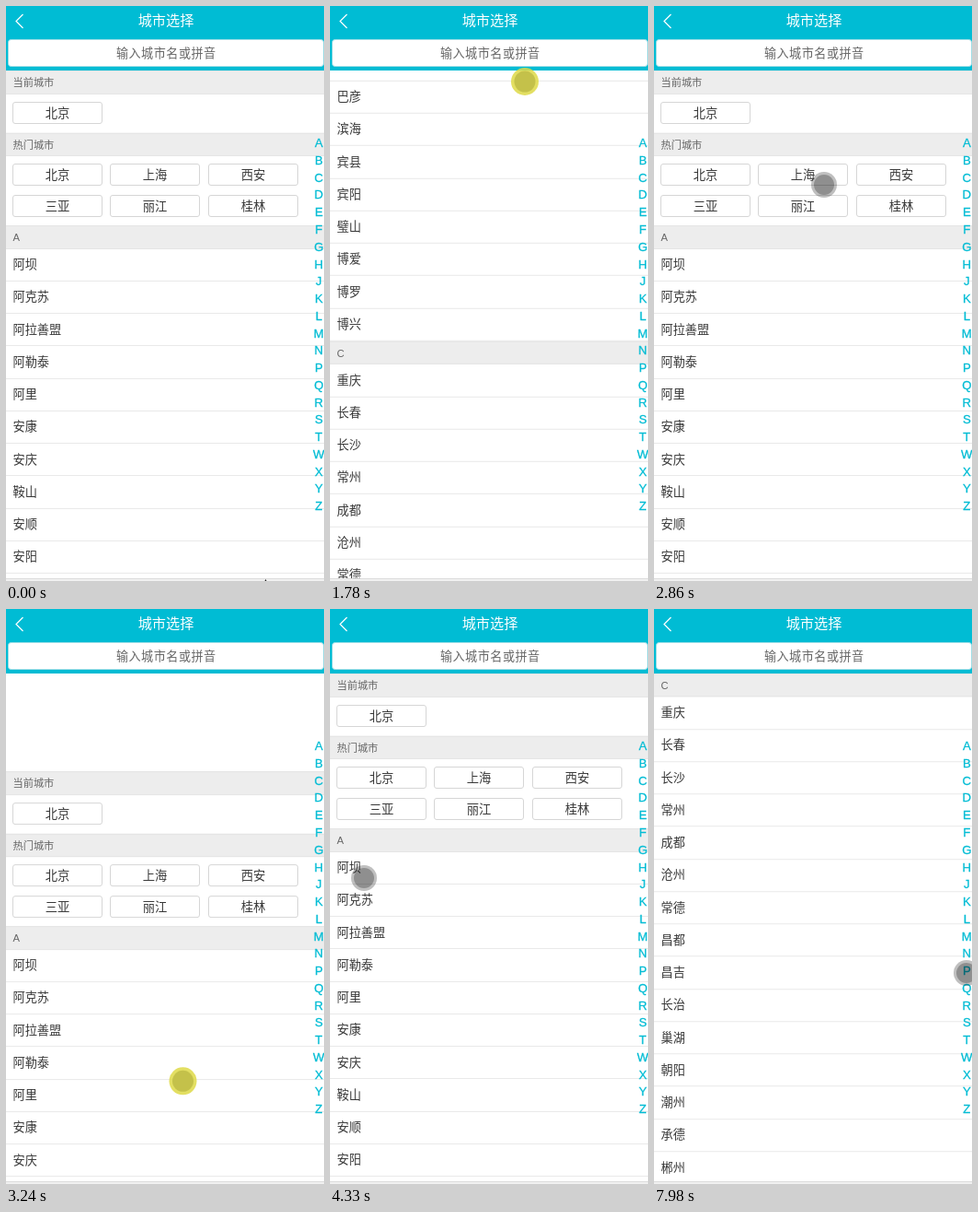
Write an HTML page that moves like this. It is 346 px wide and 624 px high and loops after 8 s.

```html
<!DOCTYPE html>
<html lang="zh-CN">
<head>
<meta charset="utf-8">
<title>城市选择</title>
<style>
  html, body { margin: 0; width: 100%; height: 100%; overflow: hidden; background: #fff; }
  svg { display: block; width: 346px; height: 624px; }
  text { font-family: "Noto Sans CJK SC", "Noto Sans CJK", "Noto Sans", sans-serif; }
  .latin { font-family: "Liberation Sans", Arial, sans-serif; }
  #index text { stroke: #00bcd4; stroke-width: .3px; }
  .title { font-weight: 500; }
  .hint { letter-spacing: .5px; }
</style>
</head>
<body>
<svg id="stage" viewBox="0 0 346 624">
  <rect width="346" height="624" fill="#fff"/>
  <g id="list"></g>
  <g id="index"></g>
  <rect y="621" width="346" height="3" fill="#f1f1f1"/>
  <rect y="621" width="346" height="1" fill="#dcdcdc"/>
  <g id="head">
    <rect width="346" height="70" fill="#00bcd4"/>
    <path d="M18.5 9 L11 16.5 L18.5 24" fill="none" stroke="#fff" stroke-width="1.2"/>
    <rect x="2.5" y="36.5" width="343" height="29" rx="3" fill="#fff" stroke="#a3dfe7"/>
  </g>
  <path id="tip" d="M281.5 624 L282.5 622 L283.5 624Z" fill="#222"/>
  <g id="cursor">
    <circle id="ring"/>
    <circle id="core"/>
  </g>
</svg>
<script>
const LOOP = 8000, STEP = 77.5, PHASE = 850;
const ROW = 35.25, BAR = 25.5, TOP = 70;
const $ = id => document.getElementById(id);
const list = $("list");

function add(parent, tag, attrs, content) {
  const el = document.createElementNS("http://www.w3.org/2000/svg", tag);
  for (const key in attrs) el.setAttribute(key, attrs[key]);
  if (content) el.textContent = content;
  parent.appendChild(el);
}

// Places text by the middle of its line.
function label(parent, content, x, mid, size, fill, anchor = "start", cls = "") {
  add(parent, "text", {
    x, y: mid + size * 0.37, "font-size": size, fill, "text-anchor": anchor, class: cls
  }, content);
}

function rule(y, fill) {
  add(list, "rect", { y: Math.round(y), width: 346, height: 1, fill });
}

function bar(content, y) {
  add(list, "rect", { y, width: 346, height: BAR, fill: "#ededed" });
  rule(y, "#e5e5e5");
  rule(y + BAR - 1, "#e5e5e5");
  label(list, content, 7.5, y + 13, 11.2, "#666", "start", content.length === 1 ? "latin" : "");
}

function button(content, col, y) {
  const x = Math.floor(col * 106.5) + 7.5;
  add(list, "rect", {
    x, y: y + 0.5, width: 97, height: 23, rx: 2.5, fill: "#fff", stroke: "#d6d6d6"
  });
  label(list, content, x + 48.5, y + 12, 13.3, "#383838", "middle");
}

const cities = {
  A: "阿坝 阿克苏 阿拉善盟 阿勒泰 阿里 安康 安庆 鞍山 安顺 安阳 " +
     "阿城 安福 安吉 安宁 安丘 安溪 安义 安远",
  B: "北京 白城 百色 白山 白银 保定 宝鸡 保山 包头 巴中 北海 蚌埠 本溪 毕节 滨州 亳州 " +
     "巴南 巴彦 滨海 宾县 宾阳 璧山 博爱 博罗 博兴",
  C: "重庆 长春 长沙 常州 成都 沧州 常德 昌都 昌吉 长治 巢湖 朝阳 潮州 承德 郴州 赤峰 池州"
};
const barTop = {};

bar("当前城市", TOP);
button("北京", 0, 104);
bar("热门城市", 137.5);
"北京 上海 西安 三亚 丽江 桂林".split(" ").forEach((name, i) =>
  button(name, i % 3, 171 + 34 * Math.floor(i / 3)));

let y = 238;
for (const letter in cities) {
  barTop[letter] = y;
  bar(letter, y);
  y += BAR;
  for (const name of cities[letter].split(" ")) {
    label(list, name, 7.5, y + 16.7, 13.2, "#383838");
    y += ROW;
    rule(y - 1, "#e9e9e9");
  }
}

[..."ABCDEFGHJKLMNPQRSTWXYZ"].forEach((c, i) =>
  label($("index"), c, 340.3, 148.3 + i * 18.76, 13.2, "#00bcd4", "middle", "latin"));

label($("head"), "城市选择", 174, 15.4, 15.2, "#fff", "middle", "title");
label($("head"), "输入城市名或拼音", 174.3, 51.2, 13.1, "#666", "middle", "hint");

// Each visit of the pointer: stops of [time, x, y], visible from first to last.
const visits = [
  [[70, 274, 640], [380, 167, 284], [530, 160, 302], [772, 160, 302], [1000, 190, 500],
   [1390, 205, 41], [1780, 212, 82], [2090, 209, 601], [2470, 209, 601], [2865, 185, 194],
   [3330, 194, 576], [4260, 21, 300], [4335, 37, 292], [4410, 37, 292], [4570, 196, 249],
   [4640, 196, 249]],
  [[5190, 338, 187], [5730, 338, 182], [5900, 338, 182], [6120, 333, 195], [6280, 290, 209],
   [6820, 21, 79], [7130, 15, 89], [7280, 282, 274], [7360, 282, 274]],
  [[7910, 341, 397], [7980, 340, 395], [LOOP, 340, 395]]
];

// The list follows the finger from down to up, then coasts to rest until end.
const gestures = [
  { down: 1000, up: 1390, end: 1775, rest: barTop.C - 363 },
  { down: 1775, up: 2090, end: 2400, rest: -14 },
  { down: 2400, up: 2400, end: 2865, rest: 0 },
  { down: 2865, up: 3330, end: 4180, rest: 0 },
  { down: 5730, up: 5885, end: 5885, rest: barTop.C - TOP }
];

const easeOut = p => 1 - (1 - p) ** 3;
const mix = (a, b, p) => a + (b - a) * p;

function pointer(t) {
  const stops = visits.findLast(v => t >= v[0][0]) || visits[0];
  const next = stops.findIndex(s => t < s[0]);
  if (next === 0) return stops[0].slice(1);
  if (next < 0) return stops.at(-1).slice(1);
  const [t0, x0, y0] = stops[next - 1], [t1, x1, y1] = stops[next];
  const p = (t - t0) / (t1 - t0);
  return [mix(x0, x1, p), mix(y0, y1, p)];
}

function scrollAt(t) {
  let pos = 0;
  for (const { down, up, end, rest } of gestures) {
    if (t < down) break;
    const drag = pointer(Math.min(t, up))[1] - pointer(down)[1];
    pos -= drag;
    if (pos < 0 && drag > 0) pos /= 3;  // resistance past the top
    if (t < up) break;
    pos = mix(pos, rest, t < end ? easeOut((t - up) / (end - up)) : 1);
  }
  return pos;
}

function circle(id, r, fill) {
  $(id).setAttribute("r", r);
  $(id).setAttribute("fill", fill);
}

const move = (id, x, y) =>
  $(id).setAttribute("transform", `translate(${x.toFixed(2)} ${y.toFixed(2)})`);
const show = (id, on) => $(id).setAttribute("visibility", on ? "visible" : "hidden");

function draw(t) {
  // Each pose is held for about a thirteenth of a second.
  const held = PHASE + STEP * Math.floor((t - PHASE) / STEP + 0.25);
  move("list", 0, -scrollAt(held));
  move("cursor", ...pointer(held));
  show("cursor", visits.some(v => t >= v[0][0] && t < v.at(-1)[0]));
  show("tip", t < 70);

  const down = gestures.some(g => t >= g.down && t < g.up);
  circle("ring", down ? 15 : 14, down ? "rgba(222,217,70,.85)" : "rgba(0,0,0,.25)");
  circle("core", down ? 11.5 : 11, down ? "rgba(190,188,70,.85)" : "rgba(0,0,0,.25)");
}

function loop() {
  draw(performance.now() % LOOP);
  requestAnimationFrame(loop);
}
loop();
</script>
</body>
</html>
```
